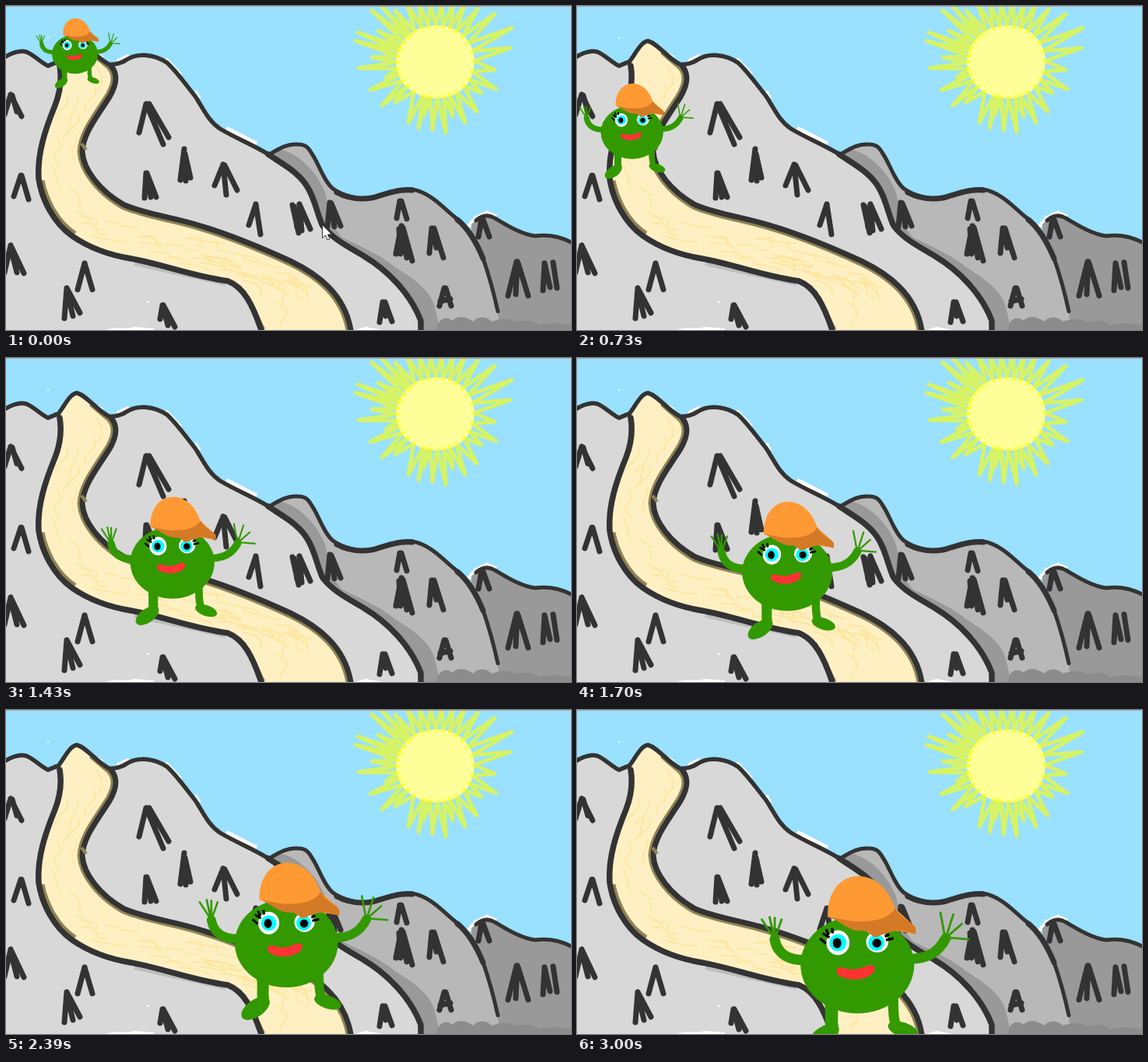
These frames come from a looping animation (726x417 px, 3020 ms). An HTML page:

```html
<!DOCTYPE html>
<html lang="en">
<head>
<meta charset="utf-8">
<title>Mountain road</title>
<style>
  html, body { margin: 0; width: 100%; height: 100%; overflow: hidden; background: #99e1ff; }
  svg { display: block; width: 100%; height: 100%; }
  .line { fill: none; stroke: #333; stroke-linecap: round; stroke-linejoin: round; }
  .tree { stroke-width: 7; }
  .limb { fill: none; stroke: #390; stroke-linecap: round; stroke-linejoin: round; }
</style>
</head>
<body>
<svg viewBox="0 0 726 417">
  <defs>
    <path id="left" d="M69 77C72 95 70 110 63 128C50 160 40 190 42 222C46 250 62 280 85 296C105 310 130 320 160 325C200 332 240 348 285 354C306 362 317 385 328 417"/>
    <path id="right" d="M135 77C146 90 140 105 133 117C115 145 99 165 98 187C99 210 120 238 152 256C180 268 215 272 250 283C290 295 330 312 365 328C400 345 435 370 443 417"/>
    <path id="roadShape" d="M67 72C75 62 82 46 91 45C105 49 115 66 135 77C146 90 140 105 133 117C115 145 99 165 98 187C99 210 120 238 152 256C180 268 215 272 250 283C290 295 330 312 365 328C400 345 435 370 443 417H328C317 385 306 362 285 354C240 348 200 332 160 325C130 320 105 310 85 296C62 280 46 250 42 222C40 190 50 160 63 128C70 110 72 95 67 72Z"/>
    <clipPath id="road"><use href="#roadShape"/></clipPath>
  </defs>

  <!-- sky and sun -->
  <path d="M0 0H726V417H0Z" fill="#99e1ff"/>
  <path d="M550 25C580 23 602 45 602 72C601 100 582 119 553 119C520 118 501 96 501 72C502 46 522 26 550 25Z" fill="#ff9"/>
  <path id="rays" fill="none" stroke="#ff0" stroke-opacity=".6" stroke-width="5" stroke-linejoin="round"/>

  <!-- far ridge -->
  <path d="M594 284L603 273L618 266L630 271" fill="none" stroke="#fff" stroke-width="5"/>
  <path d="M598 281C608 271 618 266 626 271C640 280 660 293 680 296C700 293 715 298 726 306V417H600Z" fill="#999"/>
  <path class="line" stroke-width="5" d="M604 276C612 269 620 268 628 273C642 281 660 293 680 296C700 293 715 298 728 305"/>

  <!-- middle ridge -->
  <path id="mid" d="M340 190C352 183 362 177 374 178C384 178 388 181 393 190C402 203 408 225 420 235C432 244 455 250 470 247C488 242 505 234 522 236C545 240 560 258 577 272C595 285 605 305 613 325C622 350 628 375 632 395L634 417H400Z" fill="#b8b8b8"/>
  <path d="M340 190L352 184C380 192 400 215 410 240C416 265 417 283 432 298C455 309 480 320 500 336C525 352 548 367 552 392L558 417H400Z" fill="#999"/>
  <path d="M554 417C554 402 566 398 574 405C582 396 594 402 600 406C608 397 620 401 624 406C636 403 646 400 656 407C668 402 680 406 686 411C700 406 714 408 726 411V417Z" fill="#8c8c8c"/>
  <path class="line" stroke-width="5" d="M340 190C352 183 362 177 374 178C384 178 388 181 393 190C402 203 408 225 420 235C432 244 455 250 470 247C488 242 505 234 522 236C545 240 560 258 577 272C595 285 605 305 613 325C622 350 628 375 632 393"/>
  <path class="line" stroke-width="7" d="M425 240C442 249 458 249 470 247C488 242 505 235 522 237M580 275C596 288 606 308 613 325"/>

  <!-- near mountain -->
  <path d="M205 68L224 88M283 157L322 177M143 71L158 64M112 60L124 67M243 110L248 119" stroke="#fff" stroke-width="5"/>
  <path d="M0 65C8 60 18 57 26 59C36 63 45 73 54 77C58 76 62 73 67 72C75 62 82 46 91 45C105 49 115 66 132 75C140 76 150 73 155 69C170 60 190 62 207 73C220 85 230 100 243 116C254 133 260 148 275 158C295 170 320 180 337 191C355 203 372 212 384 228C397 245 400 270 407 283C420 300 440 310 460 322C490 340 520 370 533 405V417H0Z" fill="#d8d8d8"/>
  <path d="M128 417C140 412 155 417 164 413L190 415V417ZM448 417L462 413L484 417Z" fill="#fff"/>
  <path d="M53 41h2M181 381h3" stroke="#fff" stroke-width="2"/>
  <path d="M165 331C205 340 240 348 282 357" fill="none" stroke="#bdbdbd" stroke-width="6"/>
  <use href="#roadShape" fill="#fff0c4"/>
  <g clip-path="url(#road)" fill="none">
    <path id="scribble" stroke="#ffe7a0" stroke-width="2"/>
    <use href="#right" stroke="#8f8355" stroke-width="13"/>
    <path d="M110 58L138 82M304 368L329 417M45 225C50 250 65 280 88 294" stroke="#8f8355" stroke-width="9"/>
  </g>
  <g class="line">
    <use href="#left" stroke-width="7.5"/>
    <use href="#right" stroke-width="7"/>
    <path stroke-width="5.5" d="M-2 66C8 60 18 57 26 59C36 63 45 73 54 77C58 76 62 73 67 72C75 62 82 46 91 45C105 49 115 66 132 75C140 76 150 73 155 69C170 60 190 62 207 73C220 85 230 100 243 116C254 133 260 148 275 158C295 170 320 180 337 191"/>
    <path stroke-width="7.5" d="M337 191C355 203 372 212 384 228C397 245 400 270 407 283C420 300 440 310 460 322C490 340 520 370 533 405V420"/>
  </g>
  <path d="M97 177L103 185" stroke="#8f8355" stroke-width="4"/>

  <!-- trees -->
  <g class="line tree">
    <path d="M6 114L-2 140M6 114L20 142M8 115L14 136M180 126L171 163M180 126L202 178M184 126L209 169M229 184L224 224M230 190L237 221M229 190L231 225M279 204L268 231M279 204L283 243M281 205L297 237"/>
    <path d="M180 215L178 247M181 215L193 246M183 220L186 246M19 218L10 245M20 218L29 249M321 255L312 282M321 255L327 294M368 256L376 292M377 255L391 287M370 258L374 285M377 256L380 289"/>
    <path d="M6 308L-2 343M6 308L23 344M6 312L14 343M101 331L92 365M101 331L111 365M78 363L75 402M78 363L95 395M78 366L86 399M201 385L198 403M202 385L217 413M202 388L208 411"/>
    <path d="M416 253L413 284M418 254L430 283M418 258L422 284M506 251L502 273M508 251L515 274M508 283L501 319M508 285L515 324M510 285L522 328M505 287L507 319M547 286L544 318M550 286L562 324M548 286L553 311M611 275L607 297M613 275L621 297"/>
    <path d="M656 329L645 373M658 331L671 373M657 329L655 371M692 331L690 366M692 331L699 362M703 330L708 363M563 363L557 386M565 363L572 386M558 380L571 377M484 381L480 407M487 381L496 406M484 392L488 399"/>
  </g>

  <!-- walker, drawn at full body width 133 around (360.5, 301) -->
  <g id="walker">
    <path class="limb" stroke-width="12" d="M304 295C282 297 267 289 264 271M418 294C440 295 455 288 464 270"/>
    <path class="limb" stroke-width="2.6" d="M262 268L249 248M263 268L258 245M264 268L264 246M265 268L272 248M264 268L260 254M463 267L458 240M465 267L473 242M467 267L483 253M467 269L491 271"/>
    <path class="limb" stroke-width="15" d="M328 338C333 352 329 362 331 374"/>
    <path class="limb" stroke-width="12" d="M402 335C404 350 401 360 406 372"/>
    <ellipse cx="321" cy="385" rx="21" ry="11" transform="rotate(-35 321 385)" fill="#390"/>
    <ellipse cx="414" cy="377" rx="18" ry="8.5" transform="rotate(18 414 377)" fill="#390"/>
    <ellipse cx="360.7" cy="301" rx="66.5" ry="57" fill="#390"/>
    <ellipse cx="338" cy="275" rx="13.5" ry="14.5" fill="#fff"/>
    <ellipse cx="384" cy="274" rx="13" ry="12.5" fill="#fff"/>
    <circle cx="338" cy="275" r="10" fill="#0ff"/>
    <circle cx="383" cy="275" r="9.5" fill="#0ff"/>
    <ellipse cx="337" cy="275.5" rx="5" ry="6"/>
    <circle cx="383.5" cy="275.5" r="5.3"/>
    <path d="M324 276L317 270M328 269L320 264M327 266L324 259M332 264L331 258M394 272L403 270M393 268L398 265" fill="none" stroke="#000" stroke-width="3"/>
    <path d="M337 305C345 302 350 308 358 306C368 306 373 299 380 302C385 309 374 317 360 318C345 318 334 314 337 305Z" fill="#f33"/>
    <path d="M326 245C325 216 341 197 362 197C386 198 398 216 405 235L429 257L429 265L405 261C391 264 381 270 370 261C354 262 342 248 326 245Z" fill="#f93"/>
    <path d="M328 245C342 247 354 251 367 250C381 250 397 247 405 235C412 247 425 250 429 258L429 265C420 263 412 260 405 261C394 263 389 267 381 269C375 265 373 261 367 261C353 263 342 251 328 245Z" fill="#d47a26"/>
  </g>

  <path id="cursor" d="M0 0V17L4 13.5L6.5 19.5L9.5 18.3L7 12.5H12Z" fill="#fff" stroke="#222" stroke-width=".9"/>
  <path d="M0 .5H726" stroke="#aaa"/>
</svg>
<script>
const $ = id => document.getElementById(id);

// Sun: zigzag between outer tips and points just inside the disc
const tips = [[650,28],[648,54],[628,82],[630,107],[611,112],[605,136],[590,150],[574,142],[565,163],
  [548,160],[537,140],[530,157],[517,150],[500,124],[483,128],[468,108],[488,92],[453,80],[470,66],
  [449,45],[452,34],[478,32],[470,6],[484,2],[500,6],[514,-6],[530,-6],[545,-6],[560,-6],[575,-4],
  [590,-4],[606,4],[628,10]];
const angle = ([x, y]) => Math.atan2(y - 72, x - 552);
$('rays').setAttribute('d', 'M' + tips.map((p, i) => {
  const q = tips[(i + 1) % tips.length];
  let a = angle(p), b = angle(q);
  if (b < a - Math.PI) b += 2 * Math.PI;
  if (b > a + Math.PI) b -= 2 * Math.PI;
  const m = (a + b) / 2;
  return `${p} ${552 + 49 * Math.cos(m)},${72 + 46 * Math.sin(m)}`;
}).join('L') + 'Z');

// Faint wavy strokes scattered along the road
let seed = 7;
const rand = () => (seed = seed * 16807 % 2147483647) / 2147483647;
const [edgeA, edgeB] = [$('left'), $('right')];
const lenA = edgeA.getTotalLength(), lenB = edgeB.getTotalLength();
const onRoad = (u, v) => {
  const a = edgeA.getPointAtLength(u * lenA), b = edgeB.getPointAtLength(u * lenB);
  return [a.x + (b.x - a.x) * v, a.y + (b.y - a.y) * v].map(n => n.toFixed(1));
};
let scribble = '';
for (let i = 0; i < 48; i++) {
  const u = rand() * .93, v = .15 + rand() * .6;
  scribble += `M${onRoad(u, v)}Q${onRoad(u + .02, v + .2 * rand())} ${onRoad(u + .035, v + .05)}` +
    `T${onRoad(u + .065, v + .25 * (rand() - .4))}`;
}
$('scribble').setAttribute('d', scribble);

// Walker path: time, centre x, centre y, body width
const path = [
  [0, 88.5, 62, 59], [390, 88, 102, 70], [560, 81, 132, 75], [800, 70, 178, 83],
  [1000, 99, 217, 90], [1090, 118, 229, 93.5], [1430, 219, 265, 109], [1640, 263, 274.5, 115],
  [2000, 321, 285, 124], [2190, 350, 293.5, 129], [2390, 360.5, 301, 133],
  [2730, 361, 315, 140.5], [3000, 360, 328, 146]
];
const slope = (i, k) => {
  const a = path[Math.max(i - 1, 0)], b = path[Math.min(i + 1, path.length - 1)];
  return (b[k] - a[k]) / (b[0] - a[0]);
};
function at(t, k) {
  let i = 0;
  while (i < path.length - 2 && t >= path[i + 1][0]) i++;
  const p = path[i], q = path[i + 1], h = q[0] - p[0], s = (t - p[0]) / h, r = 1 - s;
  return r * r * ((1 + 2 * s) * p[k] + s * h * slope(i, k)) +
    s * s * ((3 - 2 * s) * q[k] - r * h * slope(i + 1, k));
}

function draw(now) {
  const t = Math.floor(now % 3020 / 30) * 30;
  $('walker').setAttribute('transform',
    `translate(${at(t, 1)} ${at(t, 2)}) scale(${at(t, 3) / 133}) translate(-360.5 -301)`);
  const c = Math.min(t / 390, 1);
  $('cursor').setAttribute('transform', `translate(${406.5 - 3 * c} ${281.5 - 10 * c})`);
  $('cursor').style.display = t < 600 ? '' : 'none';
}
const start = performance.now();
function loop() {
  draw(performance.now() - start);
  requestAnimationFrame(loop);
}
loop();
</script>
</body>
</html>
```
